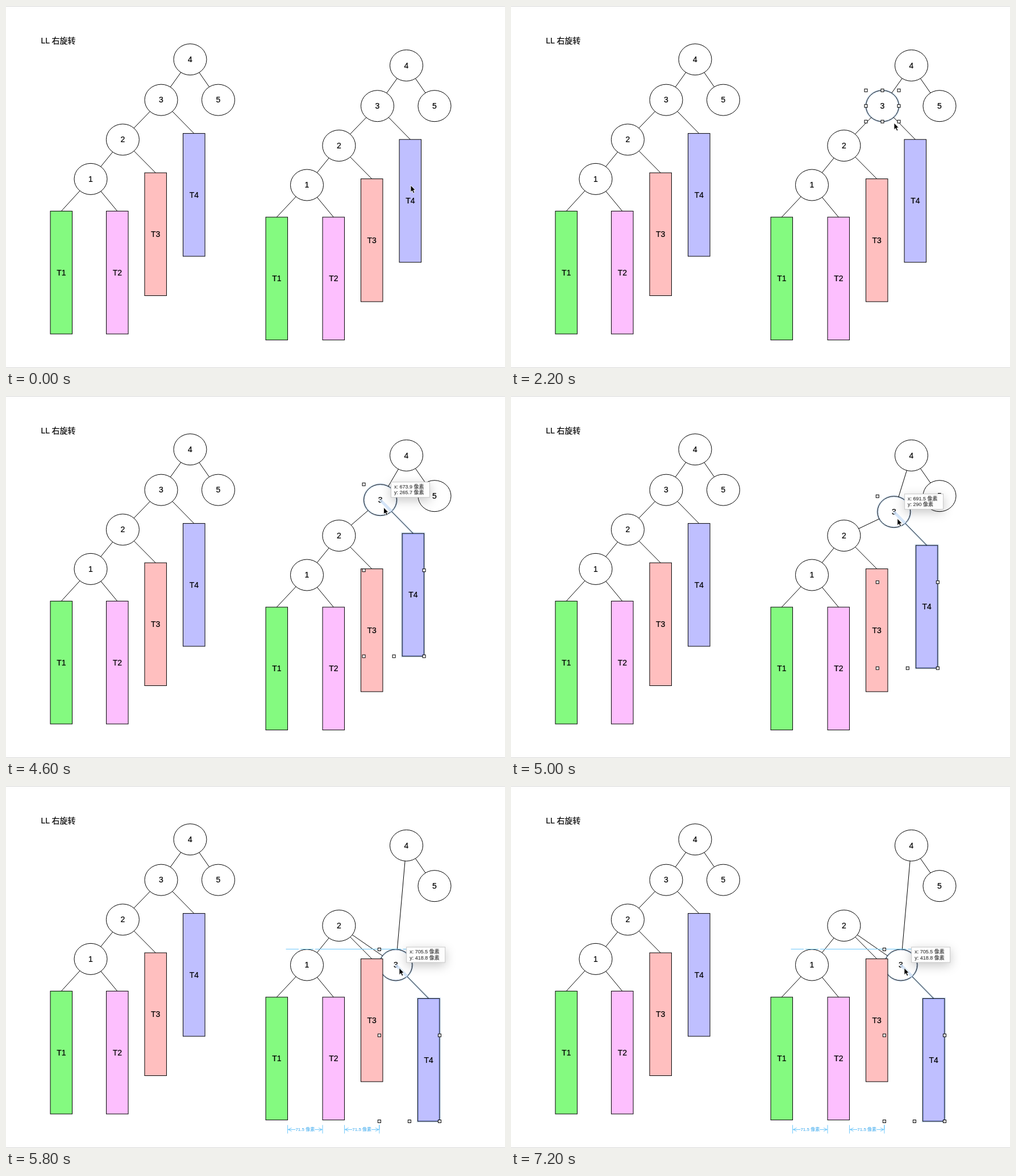
Recreate the animation shown at these times as an HTML page. Size 878x638 px, loop 8000 ms.

```html
<!DOCTYPE html>
<html lang="zh">
<head>
<meta charset="utf-8">
<title>LL 右旋转</title>
<style>
  html, body { margin: 0; width: 100%; height: 100%; overflow: hidden; background: #fff; }
  svg { display: block; width: 878px; height: 638px; }
  text {
    font: 14px "Liberation Sans", "Noto Sans CJK SC", "Noto Sans CJK", sans-serif;
    fill: #000; stroke: #000; stroke-width: .22px;
  }
  .mid { text-anchor: middle; }
  .shape { stroke: #000; stroke-width: 1; }
  .glow { fill: none; stroke: #d9e9fb; stroke-width: 4; mix-blend-mode: multiply; }
  .beam { stroke: #cfe2f9; stroke-width: 5; opacity: .85; }
  .grip { fill: #fff; stroke: #000; stroke-width: 1; }
  .guide { stroke: #6fc8fb; stroke-width: 1; fill: none; }
  .gap { font-size: 8px; font-weight: bold; fill: #6fc0f3; stroke: none; }
  .tip rect { fill: #fdfdfd; stroke: #c8c8c8; filter: drop-shadow(0 5px 9px rgba(0,0,0,.22)); }
  .tip text { font-size: 9px; fill: #3c3c3c; stroke: #3c3c3c; stroke-width: .15px; }
</style>
</head>
<body>
<svg id="stage" viewBox="0 0 878 638"></svg>
<script>
const LOOP = 8000, STEP = 200;
const PICK = 1800, PICK_ALL = 3000, GRAB = 4200;
const RX = 29, RY = 27.5, BAR_W = 38.5, BAR_H = 216.5;
const UNIT = 0.864;   // drawing units to pixels
const FILLS = { T1: '#84fa80', T2: '#fdbffe', T3: '#ffbfbf', T4: '#bfbfff' };
const EDGES = [[4, 3], [4, 5], [3, 2], [2, 1], [1, 'T1'], [1, 'T2'], [2, 'T3'], [3, 'T4']];

// Circles by centre, bars by the middle of the top side
const TREE = {
  1: [149, 304.9], 2: [205.4, 235.5], 3: [273, 165.6], 4: [324, 94.2], 5: [373.5, 165.6],
  T1: [97.3, 361.5], T2: [195.8, 361.5], T3: [263.2, 294], T4: [330.8, 224.6]
};

const easeIn = p => p * p, easeOut = p => p * (2 - p);

// Moves are start, end, x, y
const POINTER = {
  from: [712, 316],
  moves: [[0, 600, 266, 370], [600, 1000, 662, 231], [1200, 1800, 656, 186],
    [1800, 2200, 674, 206], [2400, 3000, 704, 250], [3000, 3800, 661, 183]]
};
// In the units shown by the tip
const DRAG = {
  from: [668, 257.6],
  moves: [[GRAB, 5000, 691.5, 290, easeIn], [5000, 5400, 705.5, 371], [5400, 5800, 705.5, 418.8],
    [5800, 6200, 699.2, 418.8], [6400, 6600, 705.5, 418.8]]
};

function follow({ from, moves }, t) {
  let [x, y] = from;
  for (const [start, end, toX, toY, ease = easeOut] of moves) {
    const p = ease(Math.min(1, Math.max(0, (t - start) / (end - start))));
    x += (toX - x) * p;
    y += (toY - y) * p;
  }
  return [x, y];
}

const near = (a, b) => Math.abs(a - b) < 0.6;
const crisp = v => Math.floor(v) + 0.5;
const num = v => +v.toFixed(1);
const line = (x1, y1, x2, y2, cls) =>
  `<line class="${cls}" x1="${x1}" y1="${y1}" x2="${x2}" y2="${y2}"/>`;
const label = (x, y, s, cls = 'mid') => `<text class="${cls}" x="${x}" y="${y}">${s}</text>`;
const oval = ([x, y], cls, fill = 'none') =>
  `<ellipse class="${cls}" cx="${x}" cy="${y}" rx="${RX}" ry="${RY}" fill="${fill}"/>`;
const bar = ([x, y], cls, fill = 'none') =>
  `<rect class="${cls}" x="${x - BAR_W / 2}" y="${y}" width="${BAR_W}" height="${BAR_H}" fill="${fill}"/>`;

function tree(pos, lit) {
  let out = EDGES.map(([a, b]) => line(...pos[a], ...pos[b], 'shape')).join('');
  for (let n = 1; n <= 5; n++) {
    const [x, y] = pos[n];
    out += oval(pos[n], 'shape', '#fff') + label(x, y + 4.8, n);
  }
  if (lit) out += oval(pos[3], 'glow');
  for (const name in FILLS) {
    const [x, y] = pos[name];
    out += bar(pos[name], 'shape', FILLS[name]) + label(x, y + BAR_H / 2 + 4.8, name);
  }
  return out;
}

function grips(l, t, r, b) {
  let out = '';
  for (let i = 0; i < 9; i++) {
    if (i === 4) continue;
    const x = l + (r - l) * (i % 3) / 2, y = t + (b - t) * Math.floor(i / 3) / 2;
    out += `<rect class="grip" x="${x - 2.5}" y="${y - 2.5}" width="5" height="5"/>`;
  }
  return out;
}

// The selected branch: its connection shows through the circle
function branch(c, top) {
  const dx = top[0] - c[0], dy = top[1] - c[1], k = 1 / Math.hypot(dx / RX, dy / RY);
  const rim = [c[0] + dx * k, c[1] + dy * k];
  return bar(top, 'glow') + line(...c, ...rim, 'beam') + line(...rim, ...top, 'glow');
}

// Alignment line broken around the given centres
function guide(vertical, fixed, from, to, centres) {
  const f = crisp(fixed), stops = [from];
  centres.forEach(c => stops.push(c - 14.5, c - 11.5, c + 11.5, c + 14.5));
  stops.push(to);
  let out = '';
  for (let i = 0; i < stops.length; i += 2) {
    const a = stops[i], b = stops[i + 1];
    out += vertical ? line(f, a, f, b, 'guide') : line(a, f, b, f, 'guide');
  }
  return out;
}

function spacing(a, b, y) {
  const m = (a + b) / 2;
  return line(a, y - 8, a, y + 7, 'guide') + line(b, y - 8, b, y + 7, 'guide') +
    `<path class="guide" d="M${a + 7} ${y - 3}L${a + 1} ${y}l6 3M${a} ${y}H${m - 17}M${m + 17} ${y}H${b}` +
    `M${b - 7} ${y - 3}l6 3l-6 3"/>` + label(m, y + 3, '71.5 像素', 'mid gap');
}

function tip(x, y, vx, vy) {
  return `<g class="tip"><rect x="${x}" y="${y}" width="68" height="27"/>` +
    label(x + 5.5, y + 11.3, `x: ${num(vx)} 像素`, '') +
    label(x + 5.5, y + 21.8, `y: ${num(vy)} 像素`, '') + '</g>';
}

function draw(t) {
  const [vx, vy] = follow(DRAG, t), held = t > GRAB;
  const dx = (vx - DRAG.from[0]) * UNIT, dy = (vy - DRAG.from[1]) * UNIT;
  const pos = {};
  for (const k in TREE) pos[k] = [TREE[k][0] + (k === 'T1' ? 379 : 380.5), TREE[k][1] + 10.6];
  for (const k of [3, 'T4']) pos[k] = [pos[k][0] + dx, pos[k][1] + dy];

  const c = pos[3], both = t >= PICK_ALL, lit = t >= PICK;
  const l = c[0] - RX, top = c[1] - RY;
  const r = both ? pos.T4[0] + BAR_W / 2 : c[0] + RX;
  const b = both ? pos.T4[1] + BAR_H : c[1] + RY;

  let out = '<rect width="878" height="638" fill="#fff"/>' +
    '<path d="M0 .5H878M0 637.5H878" stroke="#d6d6d6"/>' +
    label(61.5, 65.5, 'LL 右旋转', '') + tree(TREE) + tree(pos, lit);
  if (both) out += branch(c, pos.T4);

  if (held) {
    for (const [x, y] of [TREE[1], pos[1]]) {
      if (near(top, y - RY)) out += guide(false, top, x - RX - 8, r + 8, [x, (l + r) / 2]);
    }
    const [x, y] = pos[4];
    if (near((l + r) / 2, x)) out += guide(true, x, y - RY - 8, b + 8, [y, (top + b) / 2]);

    const e1 = pos.T1[0] + BAR_W / 2, e2 = pos.T2[0] - BAR_W / 2, e3 = e2 + BAR_W;
    if (near(l - e3, e2 - e1)) {
      const low = Math.max(b, pos.T1[1] + BAR_H), y = low + 14.5;
      out += spacing(e1, e2, y) + spacing(e3, l, y) + line(l, b + 6, l, y, 'guide');
    }
  }
  if (lit) out += grips(l, top, r, b);
  if (held) out += tip(c[0] + 18.8, c[1] - 31.5, vx, vy);

  const [px, py] = held ? [c[0] + 6, c[1] + 13.5 - dy * 0.06] : follow(POINTER, t);
  return out + `<path transform="translate(${px} ${py}) scale(.92)" d="M0 0V13.2L3 10.4L5.2 15.4L7.6 14.3L5.4 9.5H9.2Z"` +
    ' stroke="#fff" stroke-width="1"/>';
}

const stage = document.getElementById('stage');
let shown = -1;
function tick() {
  const step = Math.floor(performance.now() % LOOP / STEP);
  if (step !== shown) {
    shown = step;
    stage.innerHTML = draw(step * STEP);
  }
  requestAnimationFrame(tick);
}
tick();
</script>
</body>
</html>
```
